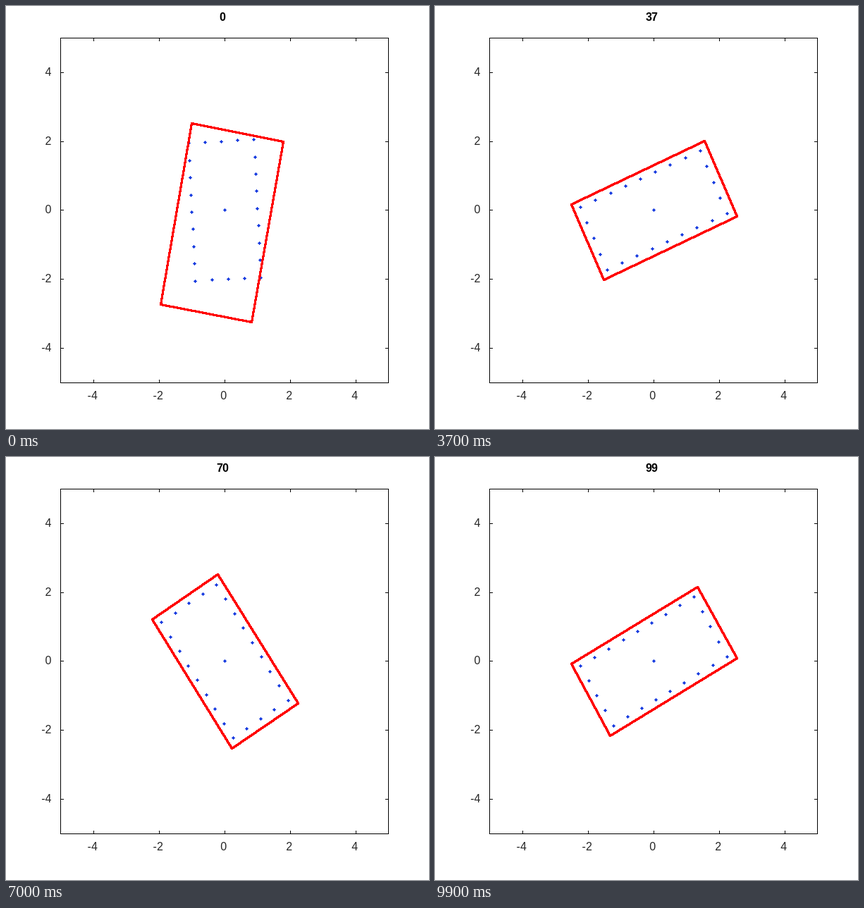
These frames come from a looping animation (600 by 600 pixels, 10000 ms). An HTML page with a canvas:

```html
<!DOCTYPE html>
<html lang="en">
<head>
<meta charset="utf-8">
<title>Rotating box fit</title>
<style>
  html, body { margin: 0; width: 100%; height: 100%; overflow: hidden; background: #fff; }
  canvas { display: block; width: 600px; height: 600px; }
</style>
</head>
<body>
<canvas id="plot" width="600" height="600"></canvas>
<script>
const ctx = document.getElementById('plot').getContext('2d');
const FONT = '16px "Liberation Sans", Arial, sans-serif';
const STEP = 100, COUNT = 100, RAD = Math.PI / 180;

const toX = x => Math.round(309.9 + 46.5 * x);
const toY = y => Math.round(289.4 - 48.9 * y);
const decay = (n, span) => Math.exp(-n / span);

function rotate([x, y], angle) {
  const c = Math.cos(angle), s = Math.sin(angle);
  return [x * c - y * s, x * s + y * c];
}

function drawAxes() {
  ctx.lineWidth = 1;
  ctx.strokeStyle = '#000';
  ctx.strokeRect(77.5, 45.5, 465, 489);
  ctx.fillStyle = '#262626';
  ctx.font = FONT;
  ctx.beginPath();
  for (let v = -4; v <= 4; v += 2) {
    const x = toX(v) + 0.5, y = toY(v) + 0.5;
    ctx.moveTo(x, 45); ctx.lineTo(x, 50);
    ctx.moveTo(x, 535); ctx.lineTo(x, 530);
    ctx.moveTo(77, y); ctx.lineTo(82, y);
    ctx.moveTo(543, y); ctx.lineTo(538, y);
    ctx.textAlign = 'center';
    ctx.fillText(v, x - 1.8, 558);
    ctx.textAlign = 'right';
    ctx.fillText(v, 64.5, y + 4.5);
  }
  ctx.stroke();
}

function drawTitle(n) {
  ctx.fillStyle = '#000';
  ctx.font = 'bold ' + FONT;
  ctx.textAlign = 'center';
  ctx.letterSpacing = '-1px';
  ctx.fillText(n, 307, 21);
  ctx.letterSpacing = '0px';
}

// Five-pixel diamond with hard edges
function drawDot(point, angle) {
  const [x, y] = rotate(point, angle);
  const px = toX(x), py = toY(y);
  for (let d = -2; d <= 2; d++) {
    const w = 2 - Math.abs(d);
    ctx.fillRect(px - w, py + d, 2 * w + 1, 1);
  }
}

// Centre mark and the outline of a 2 x 4 box at half-unit spacing
function drawDots(angle) {
  ctx.fillStyle = '#1c40e0';
  drawDot([0, 0], angle);
  for (let x = -1; x <= 1; x += 0.5) {
    for (let y = -2; y <= 2; y += 0.5) {
      if (Math.abs(x) === 1 || Math.abs(y) === 2) drawDot([x, y], angle);
    }
  }
}

// Unsmoothed line drawn with a 3 x 3 pixel brush
function drawLine([x0, y0], [x1, y1]) {
  const count = Math.max(Math.abs(x1 - x0), Math.abs(y1 - y0));
  for (let i = 0; i <= count; i++) {
    const x = Math.round(x0 + (x1 - x0) * i / count);
    const y = Math.round(y0 + (y1 - y0) * i / count);
    ctx.fillRect(x - 1, y - 1, 3, 3);
  }
}

// The fitted box starts off too large, low and behind, then settles
function drawBox(n, turn) {
  const error = 4 * decay(n, 16) - 17.4 * decay(n, 3);
  const w = 1.195 + 0.225 * decay(n, 10);
  const h = 2.234 + 0.436 * decay(n, 4);
  const cx = 0.008 - 0.093 * decay(n, 4);
  const cy = -0.368 * decay(n, 4);
  const corners = [[-w, h], [w, h], [w, -h], [-w, -h]].map(corner => {
    const [x, y] = rotate(corner, (turn + error) * RAD);
    return [toX(x + cx), toY(y + cy)];
  });
  ctx.fillStyle = '#f00';
  corners.forEach((corner, i) => drawLine(corner, corners[(i + 1) % 4]));
}

function draw(n) {
  const turn = 3 * (n + 1);
  ctx.fillStyle = '#fff';
  ctx.fillRect(0, 0, 600, 600);
  drawAxes();
  drawTitle(n);
  drawDots(turn * RAD);
  drawBox(n, turn);
}

const start = performance.now();
function tick() {
  draw(Math.floor((performance.now() - start) / STEP) % COUNT);
  requestAnimationFrame(tick);
}
tick();
</script>
</body>
</html>
```
